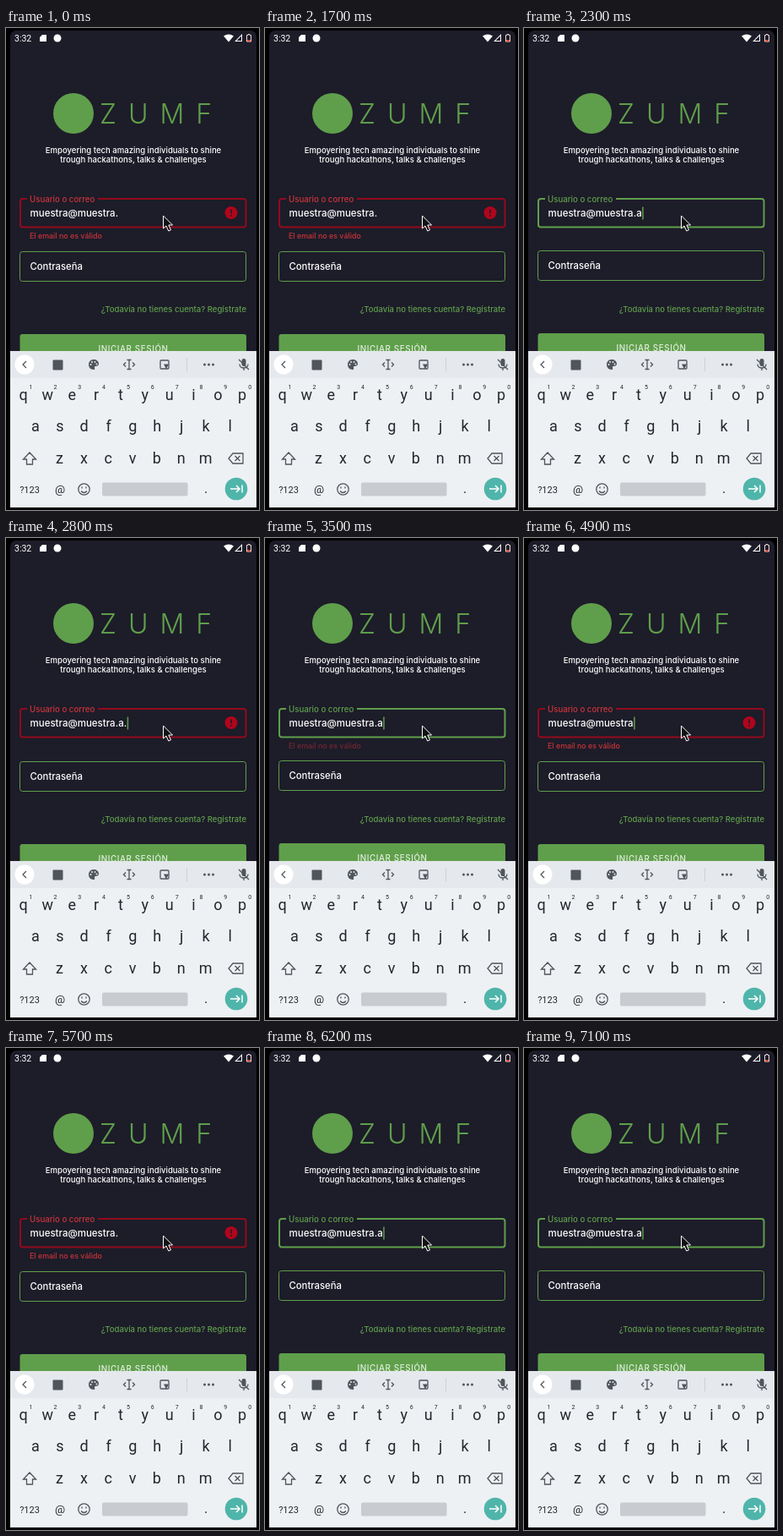
An HTML page for the animation above (7200 ms loop, 300 px wide and 570 px high).

```html
<!DOCTYPE html>
<html lang="es">
<head>
<meta charset="utf-8">
<style>
  html, body { margin: 0; width: 100%; height: 100%; overflow: hidden; background: #000; }
  svg { display: block; width: 300px; height: 570px; }
  .app { font-family: Inter, "Open Sans", sans-serif; font-weight: 500; fill: #fff; }
  .green { fill: #5f9f4b; }
  .mid { text-anchor: middle; }
  .line { fill: none; stroke: #5f9f4b; }
  .keys { font-family: Roboto, sans-serif; text-anchor: middle; fill: #23272c; }
  .icon { fill: none; stroke: #50555b; stroke-width: 1.3; }
</style>
</head>
<body>
<svg viewBox="0 0 300 570">
  <defs><clipPath id="screen"><path d="M5 567V10a7 7 0 0 1 7-7H290a7 7 0 0 1 7 7V567z"/></clipPath></defs>
  <g clip-path="url(#screen)">
    <rect width="300" height="570" fill="#1d1c29"/>

    <!-- status bar -->
    <text x="10" y="15.5" font-family="Roboto, sans-serif" font-size="10.5" fill="#fff">3:32</text>
    <path d="M43 8h5v8h-8v-5z" fill="#fff"/>
    <circle cx="61" cy="12" r="4.5" fill="#fff"/>
    <path d="M258 9.5q6-4 12 0l-6 7zM280 7v9h-9z" fill="#fff"/>
    <path d="M273.5 15h5.5V9.5z" fill="#1d1c29"/>
    <path d="M285.5 8.5h1.5v-1h2v1h1.500v7.5h-5z" fill="none" stroke="#f1d9d6"/>
    <path d="M286 14h4v2h-4z" fill="#e0523f"/>

    <!-- header -->
    <g class="app">
      <circle class="green" cx="80" cy="101" r="24"/>
      <text class="green" x="111" y="113" font-size="32" font-weight="300" letter-spacing="14">ZUMF</text>
      <g class="mid" font-size="9.55">
        <text x="151" y="148">Empoyering tech amazing individuals to shine</text>
        <text x="151" y="158.500">trough hackathons, talks &amp; challenges</text>
      </g>
    </g>

    <!-- form -->
    <g class="app">
      <path id="border" class="line" stroke-width="2" d="M25 202H20a3 3 0 0 0-3 3V232.500a3 3 0 0 0 3 3H281.500a3 3 0 0 0 3-3V205a3 3 0 0 0-3-3H109"/>
      <text id="label" x="28" y="205.500" font-size="9.7">Usuario o correo</text>
      <text id="email" x="28.500" y="222.500" font-size="11.500"></text>
      <rect id="caret" y="211.500" width="1.500" height="15" class="green"/>
      <g id="alert">
        <circle cx="267" cy="218.500" r="7.500" fill="#b0051c"/>
        <path d="M267 214.500v5M267 221v1.700" stroke="#1d1c29" stroke-width="1.600"/>
      </g>
      <text id="error" x="28" y="248.500" font-size="8.900" fill="#c9343a">El email no es válido</text>
      <text class="green" x="285" y="335.500" font-size="9.550" text-anchor="end">¿Todavía no tienes cuenta? Regístrate</text>
      <g id="lower">
        <rect class="line" x="16.500" y="264.500" width="268" height="35" rx="3"/>
        <text x="28.500" y="285.500" font-size="11.300">Contraseña</text>
        <rect class="green" x="16.500" y="362" width="268.500" height="36" rx="3"/>
        <text class="mid" x="151" y="382.500" font-size="9.800" letter-spacing=".6" fill="#e3eedf">INICIAR SESIÓN</text>
      </g>
    </g>

    <!-- keyboard -->
    <rect y="382" width="300" height="188" fill="#eef1f4"/>
    <rect y="382" width="300" height="32" fill="#e5e8ec"/>
    <circle cx="22" cy="398" r="11.500" fill="#fff"/>
    <path d="M24 394l-4 4 4 4" class="icon"/>
    <rect x="55.500" y="392.500" width="12" height="12" rx="1" fill="#50555b"/>
    <path d="M104 392c-8 0-8 12 0 12 2 0 1-2 1-3 0-2 5 0 5-4 0-3-3-5-6-5z" fill="#50555b"/>
    <g fill="#e5e8ec"><circle cx="100.500" cy="398" r="1"/><circle cx="102" cy="395" r="1"/><circle cx="105.500" cy="395" r="1"/><circle cx="107.500" cy="397.500" r="1"/></g>
    <path class="icon" d="M143.500 392.500h5M146 392.500v11M143.500 403.500h5M142 395.500l-2.500 2.500 2.500 2.500M150 395.500l2.500 2.500-2.500 2.500"/>
    <rect class="icon" x="183" y="393" width="10" height="10" rx="1"/>
    <path d="M187 397.500h6l-3 6z" fill="#50555b"/>
    <path d="M214.500 390v16" stroke="#cdd1d5"/>
    <g fill="#50555b"><circle cx="235.500" cy="398" r="1.500"/><circle cx="240.500" cy="398" r="1.500"/><circle cx="245.500" cy="398" r="1.500"/></g>
    <rect x="279.500" y="391" width="5" height="9" rx="2.500" fill="#50555b"/>
    <path class="icon" d="M277 397.500c0 6 10 6 10 0M282 402v3M276 392l12 12"/>

    <g id="keys" class="keys">
      <text x="28" y="549.500" font-size="11">?123</text>
      <text x="64" y="550" font-size="13.500">@</text>
      <text x="237" y="550" font-size="16">.</text>
    </g>
    <path class="icon" d="M28 502l7.500 8h-4v6h-7v-6h-4zM269 503h12v12h-12l-5-6zM271.500 506l6 6M277.500 506l-6 6"/>
    <circle class="icon" cx="92.500" cy="545.500" r="6.700"/>
    <path class="icon" d="M89 547.500q3.500 4 7 0M90 542.500v2M95 542.500v2"/>
    <rect x="114" y="537.500" width="101.500" height="16" rx="2" fill="#c8cbcf"/>
    <circle cx="273" cy="545" r="13.300" fill="#4fb5aa"/>
    <path d="M266 545h11M273 541l4 4-4 4M280 540.500v9" fill="none" stroke="#fff" stroke-width="1.500"/>
  </g>

  <path d="M186.500 222v15l3.500-3 2.700 6 2.800-1.200-2.700-5.800h4.700z" fill="#111" stroke="#fff"/>
</svg>

<script>
const LOOP = 7200, BLINK = 500, FADE = 200;
const RED = '#930a1c', LABEL_RED = '#c9343a', GREEN = '#5f9f4b';
const $ = id => document.getElementById(id);

// [start of caret blink, what follows the base text, valid]
const edits = [
  [100, '.', false], [2000, '.a', true], [2800, '.a.', false], [3400, '.a', true],
  [3900, '.', false], [4600, '', false], [5200, '.', false], [5800, '.a', true]
];

function key(x, y, size, char) {
  const t = document.createElementNS('http://www.w3.org/2000/svg', 'text');
  t.setAttribute('x', x);
  t.setAttribute('y', y);
  t.setAttribute('font-size', size);
  t.textContent = char;
  $('keys').append(t);
}
[['qwertyuiop', 20.5, 439.5], ['asdfghjkl', 35, 476.5], ['zxcvbnm', 63.5, 514.5]].forEach(([row, x, y], r) =>
  [...row].forEach((char, i) => {
    key(x + i * 28.85, y, 18, char);
    if (r === 0) key(x + 9 + i * 28.85, 427, 7, (i + 1) % 10);
  }));

function draw(now) {
  const t = now % LOOP;
  let n = 0;
  while (n + 1 < edits.length && t >= edits[n + 1][0]) n++;
  const [start, tail, valid] = edits[n];
  const switched = n > 0 && edits[n - 1][2] !== valid;
  const fade = switched ? Math.min(1, (t - start) / FADE) : 1;

  $('email').textContent = 'muestra@muestra' + tail;
  $('caret').setAttribute('x', 29 + $('email').getComputedTextLength());
  $('caret').style.opacity = Math.floor((t - start) / BLINK) % 2 === 0 ? 1 : 0;
  $('border').style.stroke = valid ? GREEN : RED;
  $('label').style.fill = valid ? GREEN : LABEL_RED;
  $('alert').style.opacity = valid ? 0 : 1;
  $('error').style.opacity = valid ? 1 - fade : fade;
  $('lower').setAttribute('transform', `translate(0 ${valid ? -1 : 0})`);
}

const origin = performance.now();
function tick() {
  draw(performance.now() - origin);
  requestAnimationFrame(tick);
}
tick();
</script>
</body>
</html>
```
